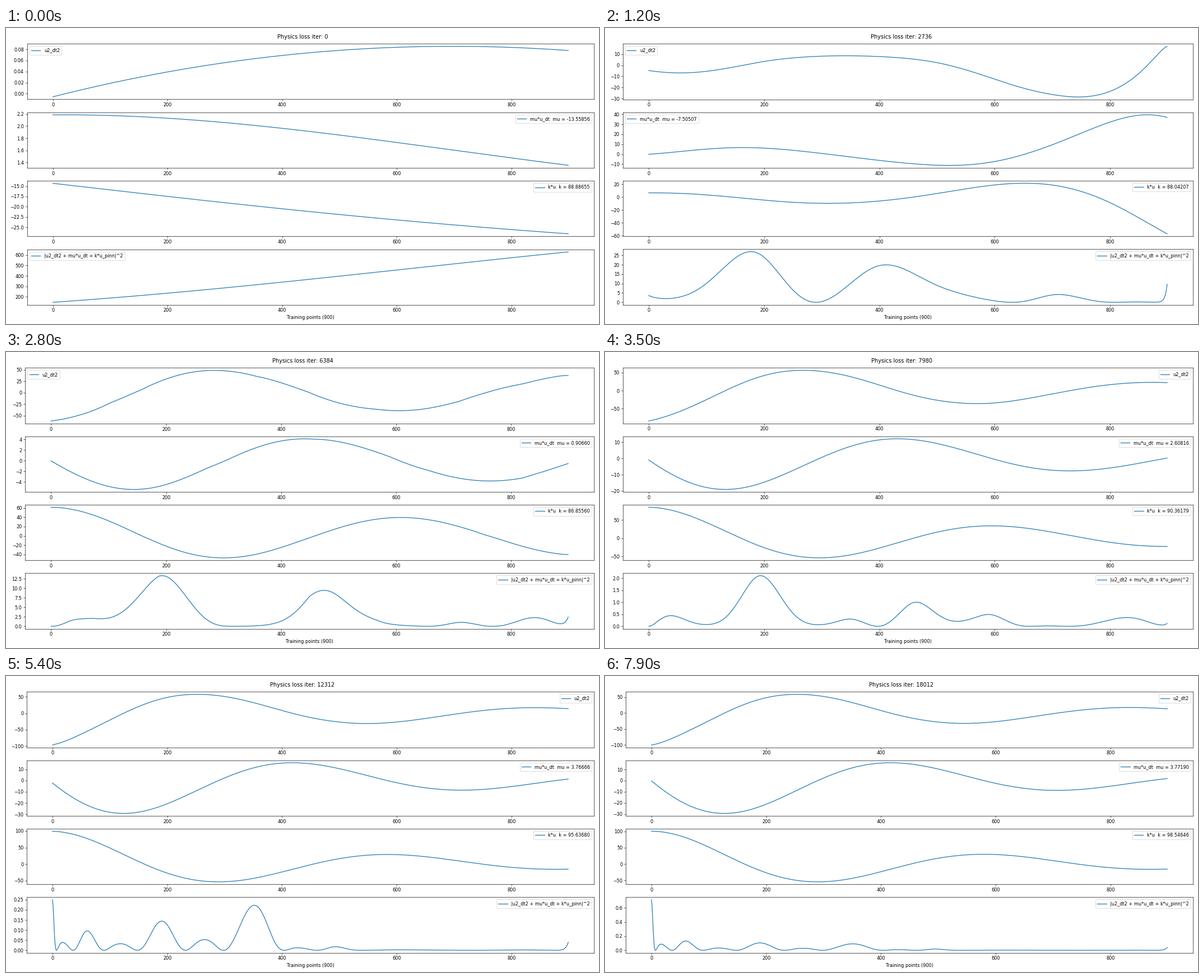
These frames come from a looping animation (1058x529 px, 8000 ms). A matplotlib script:

```python
import numpy as np
import matplotlib.pyplot as plt
from matplotlib.animation import FuncAnimation

FRAMES, INTERVAL, ITER_STEP = 80, 100, 228
POINTS = 900
X = np.arange(POINTS)
DT = 1 / POINTS
LAYOUT_DPI, STAGE_DPI = 100, 58.778
MARGINS = dict(left=0.125, right=0.9, bottom=0.11, top=0.88, hspace=0.2)


def spline(x, y, at=X):
    """Not-a-knot cubic spline."""
    x, y = np.array(x, float), np.array(y, float)
    n, h = len(x), np.diff(x)
    m, rhs = np.zeros((n, n)), np.zeros(n)
    for i in range(1, n - 1):
        m[i, i - 1:i + 2] = h[i - 1], 2 * (h[i - 1] + h[i]), h[i]
        rhs[i] = 6 * ((y[i + 1] - y[i]) / h[i] - (y[i] - y[i - 1]) / h[i - 1])
    m[0, :3] = h[1], -(h[0] + h[1]), h[0]
    m[-1, -3:] = h[-1], -(h[-2] + h[-1]), h[-2]
    c = np.linalg.solve(m, rhs)
    i = np.clip(np.searchsorted(x, at, side="right") - 1, 0, n - 2)
    d = at - x[i]
    slope = (y[i + 1] - y[i]) / h[i] - h[i] * (2 * c[i] + c[i + 1]) / 6
    return y[i] + d * (slope + d * (c[i] / 2 + d * (c[i + 1] - c[i]) / (6 * h[i])))


def pchip(t, y, at):
    """Monotone interpolation along the first axis."""
    t, y = np.array(t, float), np.array(y, float)
    column = (-1,) + (1,) * (y.ndim - 1)
    h = np.diff(t).reshape(column)
    d = np.diff(y, axis=0) / h
    p = d[:-1] * d[1:]
    inner = np.where(p > 0, 2 * p / (d[:-1] + d[1:] + (p <= 0)), 0)
    m = np.concatenate([d[:1], inner, d[-1:]])
    i = np.clip(np.searchsorted(t, at, side="right") - 1, 0, len(t) - 2)
    s = (at - t[i]).reshape(column) / h[i]
    q = 1 - s
    return (q * q * ((1 + 2 * s) * y[i] + s * h[i] * m[i])
            + s * s * ((3 - 2 * s) * y[i + 1] - q * h[i] * m[i + 1]))


def tail(height):
    """Sharp drop of the residual at the last points."""
    return -height * np.exp((X - X[-1]) / 9)


def lobes(drop, *knots):
    return spline(*zip(*knots)) + tail(drop)


def ripple(level, rise, spike):
    """Alternating lobes that widen with x and fade past the middle."""
    zeros = [0, 7, 36, 90, 148, 232, 298, 404, 461, 540, 735, 899]
    turns = [0.5, *range(1, len(zeros))]
    wave = np.sin(np.pi * pchip(zeros, turns, X))
    late = 1 / (1 + np.exp((400 - X) / 15))
    height = ((level + rise * X / 350) * (1 - late)
              + 0.14 * np.exp((400 - X) / 300) * late
              + spike * np.exp(-X / 20))
    return height * wave * (1 + 0.3 * wave) + tail(0.2)


def untrained(mu, k, ku, muv):
    """Almost straight output: integrate a cubic acceleration."""
    cubic = np.polyfit([0, 1 / 3, 2 / 3, 1], [-0.0055, 0.056, 0.0837, 0.0778], 3)
    a = np.polyval(cubic, X * DT)
    v = muv / mu + np.cumsum(a) * DT
    u = ku / k + np.cumsum(v) * DT
    return a, v, u, a + mu * v + k * u


def oscillate(mu, k, ku, muv, r):
    """Solve u'' + mu*u' + k*u = r from the end where the motion is largest."""
    way = 1 if mu > 0 else -1
    force, drag = r[::way], abs(mu)
    u, v = np.zeros(POINTS), np.zeros(POINTS)
    u[0], v[0] = ku / k, way * muv / mu
    for i in range(POINTS - 1):
        um = u[i] + v[i] * DT / 2
        vm = v[i] + (force[i] - drag * v[i] - k * u[i]) * DT / 2
        u[i + 1] = u[i] + vm * DT
        v[i + 1] = v[i] + ((force[i] + force[i + 1]) / 2 - drag * vm - k * um) * DT
    u, v = u[::way], way * v[::way]
    return r - mu * v - k * u, v, u, r


TIMES = [0, 12, 22, 35, 54, 68, 79]
MU = [-13.55856, -7.50507, -1.45685, 2.60816, 3.76666, 3.77287, 3.77190]
K = [88.88655, 88.04207, 84.96349, 90.36179, 95.63680, 97.89618, 98.54646]
LIMITS = [(-14.32, 2.186), (-57.2, 37), (-53, 2.35), (85, -0.95),
          (99.3, -2.2), (100.8, -0.75), (101, -0.25)]
RESIDUALS = [
    lobes(4.4, (0, 1.9), (70, 2.1), (190, 5.1), (290, 0), (398, -4.4),
          (500, -3), (630, 0), (702, 2), (800, 0.15), (899, 1.3)),
    lobes(3.7, (0, -0.3), (50, 1.9), (100, 2.6), (200, 5.1), (305, 0),
          (400, -2.6), (484, -4.5), (600, -0.6), (650, 0), (707, 1.8),
          (760, 0.7), (899, 1)),
    lobes(0.5, (0, 0), (57, 0.58), (105, 0.28), (191, 1.45), (290, 0.26),
          (349, 0.55), (397, 0), (461, -1), (530, -0.46), (592, -0.7),
          (660, 0), (720, 0.05), (899, 0.15)),
    ripple(0.2, 0.17, 0.185),
    ripple(0.25, 0.02, 0.35),
    ripple(0.265, -0.03, 0.385),
]

first = np.array(untrained(MU[0], K[0], *LIMITS[0]))
trained = np.array([oscillate(mu, k, *ends, r) for mu, k, ends, r
                    in zip(MU[1:], K[1:], LIMITS[1:], RESIDUALS)])
# The output collapses towards zero right after training starts
collapsed = 0.1 * (first + trained[0])
states = np.array([first, collapsed, *trained])

steps = np.arange(FRAMES)
mus = pchip(TIMES, MU, steps)
ks = pchip(TIMES, K, steps)
curves = pchip([0, 1] + TIMES[1:], states, steps)

fig, axes = plt.subplots(4, 1, figsize=(18, 9), dpi=STAGE_DPI)
title = fig.suptitle("Physics loss iter: 0")
axes[3].set_xlabel(f"Training points ({POINTS})")
labels = ["u2_dt2", "mu*u_dt", "k*u", "|u2_dt2 + mu*u_dt + k*u_pinn|^2"]
lines = [ax.plot(X, X, label=s)[0] for ax, s in zip(axes, labels)]
texts = [ax.legend(loc="best").get_texts()[0] for ax in axes]


def arrange():
    """Measure text at the larger size, where rounding matters less."""
    fig.subplots_adjust(**MARGINS)
    fig.dpi = LAYOUT_DPI
    fig.tight_layout()
    fig.dpi = STAGE_DPI


def update(n):
    mu, k = mus[n], ks[n]
    a, v, u, r = curves[n]
    title.set_text(f"Physics loss iter: {n * ITER_STEP}")
    texts[1].set_text(f"mu*u_dt  mu = {mu:.5f}")
    texts[2].set_text(f"k*u  k = {k:.5f}")
    for ax, line, y in zip(axes, lines, (a, mu * v, k * u, r ** 2)):
        line.set_ydata(y)
        ax.relim()
        ax.autoscale_view()
    arrange()
    return lines


anim = FuncAnimation(fig, update, frames=FRAMES, interval=INTERVAL,
                     init_func=lambda: lines, repeat=True, repeat_delay=0)
plt.show()
```
